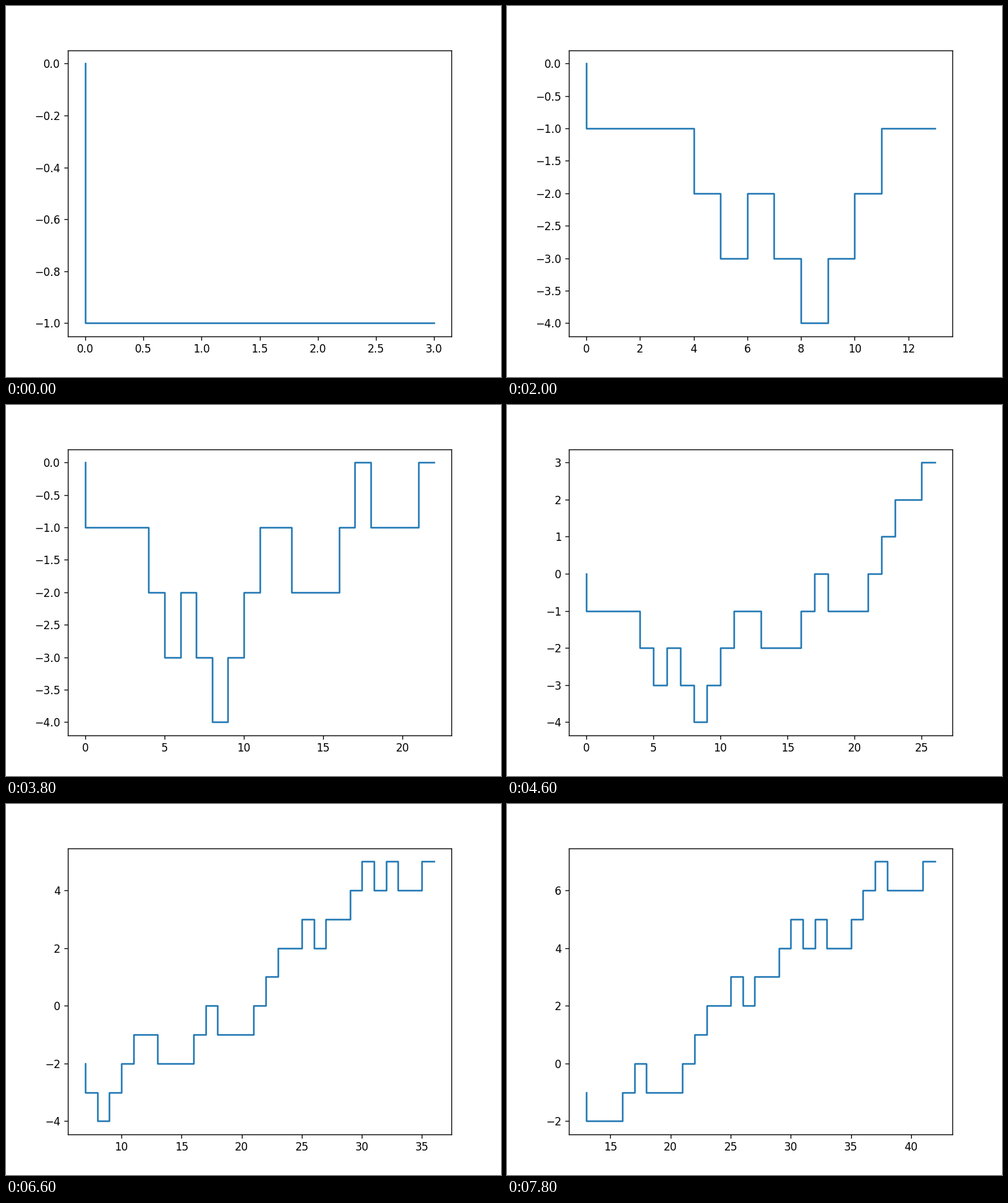
Recreate the animation shown at these times as a matplotlib script. Size 768x576 px, loop 8000 ms.

```python
import numpy as np
import matplotlib.pyplot as plt
from matplotlib.animation import FuncAnimation

FRAMES = 40
INTERVAL = 200
WINDOW = 30
FIRST = 4  # points visible at the start

# Random walk: change of height at each whole x
STEPS = [0, -1, 0, 0, 0, -1, -1, 1, -1, -1, 1, 1, 1, 0, -1, 0, 0, 1, 1, -1, 0, 0,
         1, 1, 1, 0, 1, -1, 1, 0, 1, 1, -1, 1, -1, 0, 1, 1, 1, -1, 0, 0, 1]
heights = np.cumsum(STEPS)
xs = np.arange(len(heights))

fig, ax = plt.subplots(figsize=(6.4, 4.8), dpi=120)


def draw(i):
    end = FIRST + i
    view = slice(max(0, end - WINDOW), end)
    ax.clear()
    return ax.step(xs[view], heights[view], color="tab:blue", lw=1.5)


def init():
    return draw(0)


anim = FuncAnimation(fig, draw, frames=FRAMES, init_func=init,
                     interval=INTERVAL, repeat=True, repeat_delay=0)
plt.show()
```
